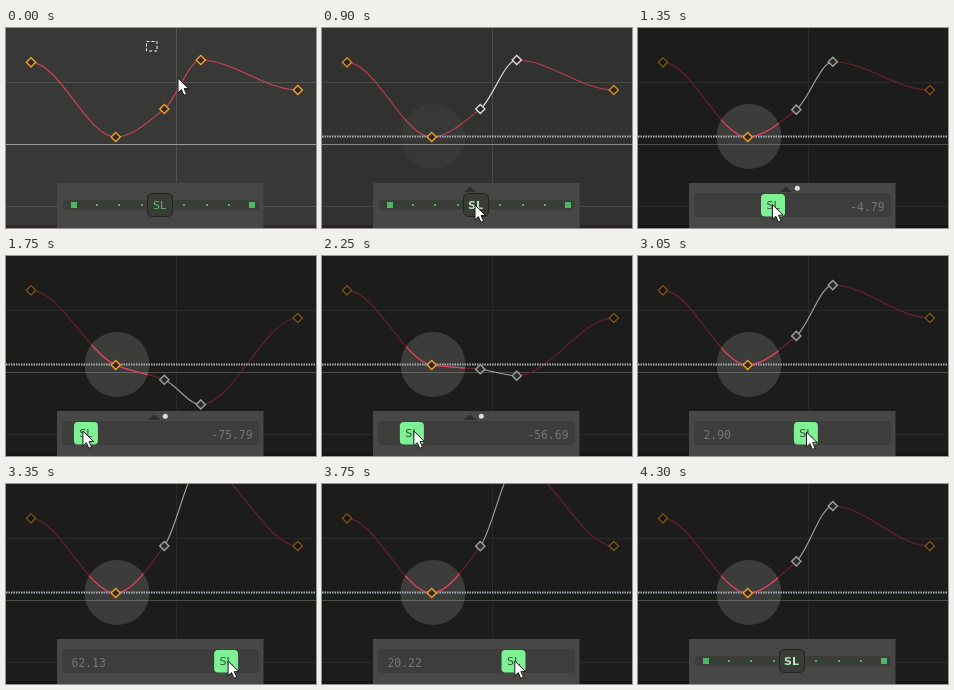
Animation, 310 px wide and 200 px high, one loop 4500 ms. Source, as an HTML page:

```html
<!DOCTYPE html>
<html lang="en">
<head>
<meta charset="utf-8">
<title>Curve slider</title>
<style>
  html, body { margin: 0; width: 100%; height: 100%; overflow: hidden; background: #383837; }
  svg { display: block; width: 310px; height: 200px; }
  .curve { fill: none; stroke: #d3405a; stroke-width: 1.15; }
  .key { fill: #2c2a26; stroke: #f3a024; stroke-width: 1.4; }
  .green { fill: #4fb565; }
  text { font-family: "DejaVu Sans", sans-serif; }
  #value { font: 11.4px "DejaVu Sans Mono", monospace; fill: #757572; }
  .name { font-size: 11px; text-anchor: middle; }
</style>
</head>
<body>
<svg viewBox="0 0 310 200">
  <defs>
    <path id="diamond" d="M0-4.6L4.6 0 0 4.6-4.6 0Z"/>
    <clipPath id="spot"><circle cx="111" cy="108.5" r="32.5"/></clipPath>
  </defs>

  <rect width="310" height="200" fill="#383837"/>
  <path d="M0 54.5H310M0 178.5H310M170.5 0V200" stroke="#535352"/>
  <path d="M0 116.5H310" stroke="#9a9a99"/>
  <rect y="197" width="310" height="3" fill="#30282a"/>
  <path class="curve" id="left"/>
  <path class="curve" id="right"/>
  <use class="key" href="#diamond" x="25" y="34.3"/>
  <use class="key" href="#diamond" x="291.8" y="62"/>
  <rect id="shade" width="310" height="200"/>

  <circle id="glow" cx="111" cy="108.5" r="32.5" fill="#fffff4"/>
  <g id="guide">
    <path d="M0 108.5H310" stroke="#a5b0bd" stroke-width="2" stroke-dasharray="1.5 1"/>
  </g>
  <path class="curve" id="bright" clip-path="url(#spot)" style="stroke:#f0405c"/>
  <path class="curve" id="middle"/>
  <use class="key" href="#diamond" x="109.7" y="109"/>
  <use class="key" id="key3" href="#diamond" x="158.3"/>
  <use class="key" id="key4" href="#diamond" x="194.8"/>

  <rect id="marquee" x="140.5" y="13.5" fill="none" stroke="#f2f2f2" stroke-dasharray="3 2"/>

  <rect x="51" y="155" width="206.5" height="45" fill="#474745"/>
  <path id="arrow" d="M142 164L148 158.5 154 164Z" fill="#2e2e2c"/>
  <circle id="dot" cx="159.3" cy="160.3" r="2.5" fill="#dededc"/>

  <g id="idle">
    <rect x="57" y="172" width="196" height="10" rx="4" fill="#3b3d39"/>
    <g id="ticks" class="green">
      <rect x="65" y="174" width="6" height="6"/>
      <rect x="243" y="174" width="6" height="6"/>
    </g>
    <rect x="141.5" y="165.5" width="25" height="23" rx="4.5" fill="#393b37" stroke="#252624"/>
    <text id="label" class="name" x="153.5" y="181">SL</text>
  </g>

  <g id="slider">
    <rect x="56" y="165" width="197" height="24" rx="4" fill="#3d3d3b"/>
    <text id="value" y="183"></text>
    <g id="handle">
      <rect x="-12" y="166" width="24" height="22.5" rx="4" fill="#7df194"/>
      <text class="name" y="181" fill="#30543a">SL</text>
    </g>
  </g>

  <path id="cursor" d="M0 0V14.8L3.4 11.6 5.9 17.3 8.6 16.1 6.1 10.6H10.7Z" fill="#fff" stroke="#1a1a1a"/>
</svg>

<script>
const LOOP = 4500, STEP = 50, CENTER = 153.5, REACH = 84.5;
const el = id => document.getElementById(id);
const set = (id, attrs) => {
  for (const name in attrs) el(id).setAttribute(name, attrs[name]);
};
const show = (id, on) => set(id, { visibility: on ? "visible" : "hidden" });

for (const x of [91, 113, 136, 178, 201, 223]) {
  const tick = document.createElementNS("http://www.w3.org/2000/svg", "rect");
  tick.setAttribute("x", x - 1);
  tick.setAttribute("y", 176);
  tick.setAttribute("width", 2);
  tick.setAttribute("height", 2);
  el("ticks").append(tick);
}

// Piecewise linear track of [time, value, ...] points
function track(points, t, column = 1) {
  const next = points.findIndex(p => p[0] > t);
  if (next < 0) return points[points.length - 1][column];
  if (next === 0) return points[0][column];
  const a = points[next - 1], b = points[next];
  return a[column] + (b[column] - a[column]) * (t - a[0]) / (b[0] - a[0]);
}

const drag = [
  [1200, 0], [1300, -9], [1400, -28], [1500, -50], [1600, -68], [1700, -73.4],
  [1750, -73.563], [1850, -75], [2000, -73], [2100, -68], [2200, -63.7],
  [2250, -63.622], [2350, -60], [2500, -42], [2650, -17.3], [2700, -10.952],
  [2800, -3], [2900, 6], [3150, 20], [3250, 34], [3300, 48.9], [3350, 66.605],
  [3400, 76], [3450, 80], [3500, 80], [3600, 70], [3750, 38], [3850, 25], [3900, 21.5]
];
const grip = [[1250, 0], [1750, -3], [2250, 2], [2700, -1], [3350, 2], [3950, 1]];
const approach = [
  [-50, 151, 23], [0, 172, 50], [50, 190, 77], [100, 201, 103], [150, 208, 124],
  [250, 211, 138], [700, 211, 138], [750, 204, 143], [800, 180, 159],
  [850, 159, 173], [900, 153, 177]
];
const leave = [[4050, 176, 176.5], [4100, 185, 179], [4300, 240, 205]];

// The slider responds to the square of its travel
const amount = h => Math.sign(h) * 100 * (h / REACH) ** 2;

// Monotone cubic through the keys, one path per segment
function segments(keys) {
  const slope = keys.slice(1).map((k, i) => (k[1] - keys[i][1]) / (k[0] - keys[i][0]));
  const tangent = keys.map((_, i) => {
    const a = slope[i - 1], b = slope[i];
    return a * b > 0 ? 2 * a * b / (a + b) : 0;
  });
  return slope.map((_, i) => {
    const [x0, y0] = keys[i], [x1, y1] = keys[i + 1], d = (x1 - x0) / 3;
    return `M${x0} ${y0}C${x0 + d} ${y0 + d * tangent[i]} ` +
      `${x1 - d} ${y1 - d * tangent[i + 1]} ${x1} ${y1}`;
  });
}

function cursorAt(t) {
  if (t < 1250) return [track(approach, t), track(approach, t, 2)];
  if (t < 4050) {
    return [CENTER + track(drag, t) + track(grip, t),
      track([[1250, 177], [1750, 175], [2700, 175], [3350, 177]], t)];
  }
  return [track(leave, t), track(leave, t, 2)];
}

function draw(t) {
  const travel = track(drag, t), value = amount(travel);
  const pose = amount(track(drag, t - STEP)); // the curve trails the handle by a step
  const y3 = 81 - 0.567 * pose, y4 = 32 - 1.544 * pose;
  const dim = track([[850, 0], [900, 0.25], [1050, 1]], t);
  const selected = t >= 400, hover = t >= 850, active = t >= 1200 && t < 4100;

  const paths = segments([[25, 34.3], [109.7, 109], [158.3, y3], [194.8, y4], [291.8, 62]]);
  set("left", { d: paths[0] + paths[1] });
  set("bright", { d: paths[0] + paths[1], opacity: dim });
  set("middle", { d: paths[2] });
  set("right", { d: paths[3] });

  const light = Math.round(240 - 80 * dim);
  const tone = selected ? `rgb(${light},${light},${light})` : "";
  for (const id of ["middle", "key3", "key4"]) el(id).style.stroke = tone;
  set("key3", { y: y3 });
  set("key4", { y: y4 });

  set("shade", { opacity: 0.5 * dim });
  set("glow", { opacity: 0.14 * dim });
  show("guide", hover);

  show("marquee", !selected);
  set("marquee", {
    width: track(approach, t - STEP) - 140.5,
    height: track(approach, t - STEP, 2) - 13.5
  });

  show("arrow", hover && t < 2450);
  show("dot", t >= 1250 && t < 2450);
  show("idle", !active);
  show("slider", active);
  set("label", {
    fill: hover ? "#b5e5bd" : "#58b96b",
    "font-weight": hover ? "bold" : "normal"
  });
  set("handle", { transform: `translate(${CENTER + travel} 0)` });
  const positive = value > 0;
  set("value", { x: positive ? 65.5 : 246.5, "text-anchor": positive ? "start" : "end" });
  el("value").textContent = value.toFixed(2);

  set("cursor", { transform: `translate(${cursorAt(t).join(" ")})` });
  show("cursor", t < 4300);
}

const start = performance.now();
function frame(now) {
  const t = Math.max(0, now - start) % LOOP;
  draw(Math.floor(t / STEP) * STEP);
  requestAnimationFrame(frame);
}
draw(0);
requestAnimationFrame(frame);
</script>
</body>
</html>
```
